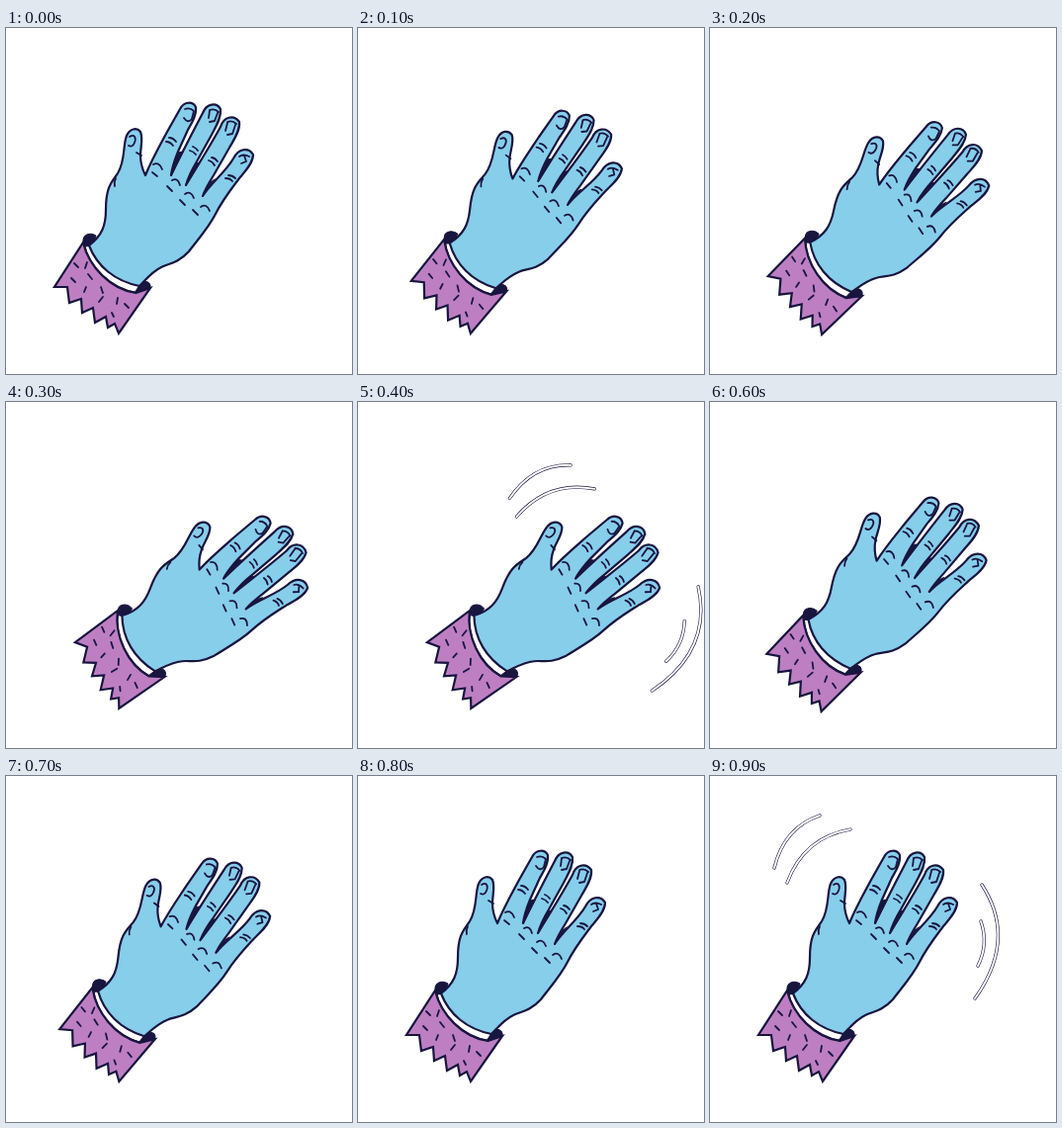
Write an HTML page that moves like this. It is 350 px wide and 350 px high and loops after 1000 ms.

```html
<!DOCTYPE html>
<html lang="en">
<head>
<meta charset="utf-8">
<title>Waving hand</title>
<style>
  html, body { margin: 0; width: 100%; height: 100%; overflow: hidden; background: #fff; }
  svg { display: block; width: 100%; height: 100%; }
  path { stroke: #18153f; stroke-linecap: round; stroke-linejoin: round; }
  .ink { fill: none; stroke-width: 1.8; }
  .skin { fill: #87ceeb; stroke-width: 2.2; }
  .cloth { fill: #bd7fc2; stroke-width: 2.2; stroke-linejoin: miter; }
  .dark { fill: #18153f; stroke-width: 1; }
  .lining { fill: #fff; stroke-width: 1.8; }
  .edge { fill: none; stroke-width: 3.2; }
  .core { fill: none; stroke: #fff; stroke-width: 2; }
</style>
</head>
<body>
<svg viewBox="0 0 350 350">
  <g id="hand">
    <path class="lining" d="M79 219C84 242 106 264 133 268L138 258L90 214Z"/>
    <path class="dark" d="M78 216C77 209 85 206 91 210L88 220L80 221Z"/>
    <path class="dark" d="M130 268L137 257C143 255 147 258 146 263Z"/>
    <path class="skin" d="M84 220C97 210 101 200 101 184C101 160 107 156 113 147C121 134 118 119 122 109C125 102 132 100 136 105C139 112 136 120 136 129C136 138 138 143 141 149
      C147 134 155 120 163 105L176 82C180 74 189 74 192 80C193 88 188 96 184 103L174 125C170 135 168 141 167 149
      C176 130 188 107 199 86C203 76 213 75 217 82C218 91 212 100 208 108L193 135C187 145 184 152 182 159
      C192 142 205 122 217 100C220 90 230 87 236 95C237 104 230 114 226 121L210 149C205 157 201 164 199 170
      C207 157 222 146 230 132C235 122 245 120 250 128C250 137 241 146 236 152C227 164 219 174 212 188C205 202 194 214 185 226C173 239 164 238 157 242C147 247 142 254 135 261
      C110 256 92 241 84 220Z"/>
    <path class="dark" d="M167 149L174 126L179 125ZM182 159L192 137L196 136ZM199 170L207 156L211 153Z"/>
    <path class="cloth" d="M78 217C84 242 106 264 131 268L146 263L114 309L110 299L103 303L101 292L90 298L88 283L77 288L76 274L64 278L62 262L49 262Z"/>
    <path class="ink" id="marks"/>
  </g>
  <g id="swish"></g>
</svg>
<script>
  const $ = id => document.getElementById(id);

  const marks = [
    // nails
    'M125 110C130 107 132 111 130 116Q128 121 124 119',
    'M181 82Q186 80 190 84L188 92Q184 97 180 91',
    'M206 83Q211 81 215 85M206 83L205 91M214 86L211 94L206 95',
    'M224 95Q229 93 233 97M224 96L222 104M232 98L229 107L224 108',
    'M236 130Q240 127 246 130M241 129L243 135L238 137',
    // finger folds
    'M132 126L137 129M165 111Q169 111 172 115M162 115Q166 115 169 119',
    'M189 120Q192 121 194 124M186 124Q190 125 192 128',
    'M208 131Q211 131 214 135M205 134Q209 135 211 139',
    'M225 149Q229 149 232 152M222 152Q227 152 229 155',
    // knuckles
    'M149 138Q155 135 158 143M148 146L153 150',
    'M168 154Q174 151 176 159M163 160L168 165',
    'M181 168Q187 164 190 172M176 174L181 179',
    'M197 181Q203 177 206 185M189 184L194 189',
    'M111 152Q109 156 110 160',
    // sleeve flecks
    'M69 238L73 242M82 237L80 243M66 253L70 257M83 249L87 254',
    'M79 267L81 262M96 262L98 268M94 277L98 272M113 273L112 279M107 288L109 292M120 279L124 283'
  ];
  $('marks').setAttribute('d', marks.join(''));

  const arcs = [
    'M65 93Q75 52 111 40',
    'M78 108Q95 62 142 54',
    'M275 110Q311 165 268 225',
    'M274 147Q282 170 271 192'
  ];
  $('swish').innerHTML = arcs.map(d =>
    `<path class="edge" d="${d}"/><path class="core" d="${d}"/>`).join('');

  const place = (angle, x, y) => `translate(${x} ${y}) rotate(${angle} 114 308)`;

  const STEP = 100;
  const left = place(0, 0, 0);
  const right = place(20.5, 0.7, 1);
  const poses = [
    left, place(5.6, 0, 0), place(11.4, -0.7, 1), right, right,
    right, place(10.6, -1.2, 4), place(5.5, 0.5, 0), left, left
  ];
  const swishAt = { 4: place(20.5, 10, 8), 9: left };

  function draw() {
    const i = Math.floor(performance.now() / STEP) % poses.length;
    const swish = swishAt[i];
    $('hand').setAttribute('transform', poses[i]);
    $('swish').setAttribute('visibility', swish ? 'visible' : 'hidden');
    if (swish) $('swish').setAttribute('transform', swish);
    requestAnimationFrame(draw);
  }
  draw();
</script>
</body>
</html>
```
